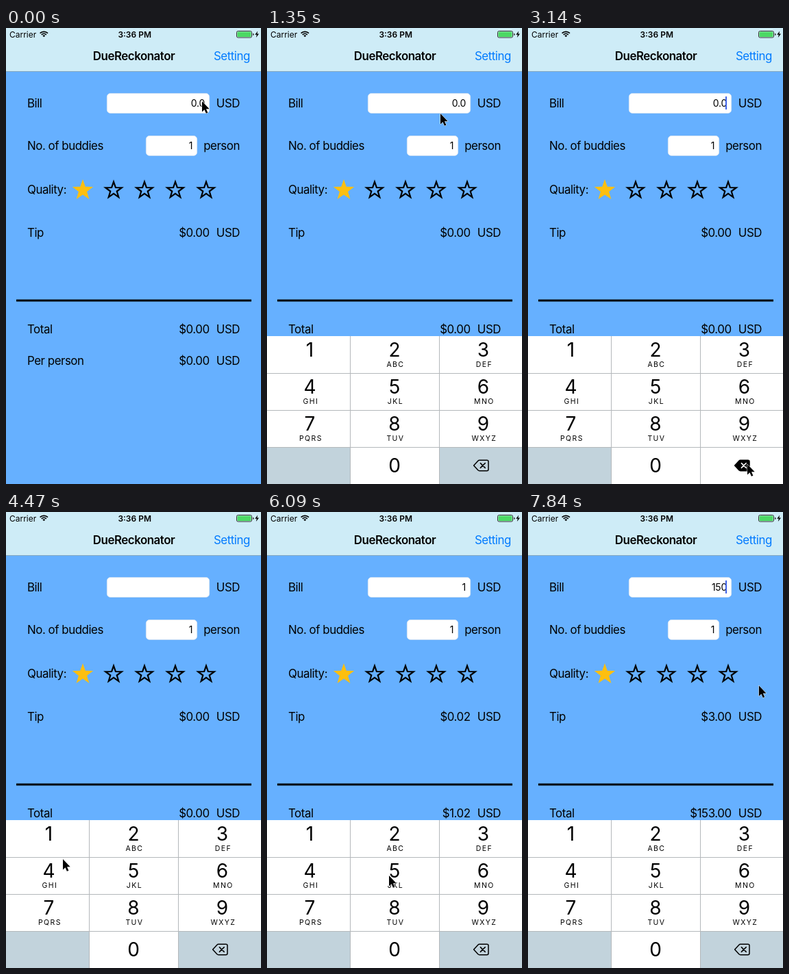
Write an HTML page that moves like this. It is 372 by 666 pixels and loops after 7.99 s.

```html
<!DOCTYPE html>
<html lang="en">
<head>
<meta charset="utf-8">
<title>DueReckonator</title>
<style>
  html, body { margin: 0; width: 100%; height: 100%; overflow: hidden; background: #66b0ff; }
  svg { display: block; width: 372px; height: 666px; font-family: Inter, Roboto, "Liberation Sans", sans-serif; }
  text { font-size: 16.9px; letter-spacing: -.47px; white-space: pre; }
  .end { text-anchor: end; }
  .mid { text-anchor: middle; }
  .input { font-size: 14px; letter-spacing: -.25px; }
  .status { font-size: 12px; letter-spacing: 0; }
  .bold { font-weight: 600; }
  .digit { font-size: 28px; letter-spacing: 0; }
  .letters { font-size: 10.5px; letter-spacing: 1.4px; }
  .star { fill: none; stroke: #000; stroke-width: 2.2; }
  .star.lit { fill: #fdbf0f; stroke: none; }
</style>
</head>
<body>
<svg viewBox="0 0 372 666">
  <rect width="372" height="666" fill="#66b0ff"/>

  <rect width="372" height="63" fill="#ceecf7"/>
  <rect y="63" width="372" height="1" fill="#86a9bf"/>
  <text class="status" x="5" y="13.5">Carrier</text>
  <g fill="none" stroke="#000" stroke-width="1.7">
    <path d="M49.6 7.7a8.1 8.1 0 0 1 11.4 0M51.8 9.9a5 5 0 0 1 7 0"/>
    <path d="M55.3 13.2l-1.9-2a2.7 2.7 0 0 1 3.8 0z" fill="#000" stroke="none"/>
  </g>
  <text class="status bold mid" x="187.7" y="13.5">3:36 PM</text>
  <rect x="336.5" y="4.5" width="22" height="9.5" rx="2" fill="none" stroke="#333"/>
  <rect x="337.5" y="5.5" width="20" height="7.5" rx="1" fill="#4cd964"/>
  <path d="M360 7.5q1.6 .4 1.6 1.8t-1.6 1.8z" fill="#333"/>
  <path d="M367.2 4.5l-4 5.3h2.6l-1 4.2 4.2-5.6h-2.7z"/>
  <text class="bold mid" x="186.5" y="47">DueReckonator</text>
  <text x="303" y="47" fill="#007aff">Setting</text>

  <text x="31" y="116">Bill</text>
  <text x="31" y="178">No. of buddies</text>
  <text x="31" y="242">Quality:</text>
  <text x="31" y="305">Tip</text>
  <text x="31" y="446">Total</text>
  <text x="31" y="491.5">Per person</text>
  <text class="end" x="341" y="178">person</text>
  <g id="units"></g>

  <g fill="#fff" stroke="#d3dfec" stroke-width=".6">
    <rect x="147.3" y="95.5" width="149.4" height="29" rx="5"/>
    <rect x="204.3" y="157.5" width="74.4" height="29" rx="5"/>
  </g>
  <text id="bill" class="input end" x="290" y="115"></text>
  <text class="input end" x="272.3" y="177">1</text>
  <rect id="caret" x="288" y="100" width="2" height="19" fill="#3f63e8"/>

  <g id="stars"></g>
  <text id="tip" class="end" x="296.6" y="305"></text>
  <rect x="15" y="396.5" width="343" height="3"/>
  <text id="total" class="end" x="296.6" y="446"></text>
  <text id="each" class="end" x="296.6" y="491.5"></text>

  <g id="pad">
    <rect y="450" width="372" height="216" fill="#fff"/>
    <g id="keys"></g>
    <path d="M0 504.5H372M0 558.5H372M0 612.5H372M121.5 450V666M251.5 450V666" stroke="#b4b8bb" fill="none"/>
    <g id="faces"></g>
    <g id="erase" stroke="#000" stroke-width="1.5" stroke-linejoin="round" stroke-linecap="round">
      <path d="M301.6 639l6.2-6.8q.9-.9 2.1-.9h11q2.1 0 2.1 2.1v11.2q0 2.1-2.1 2.1h-11q-1.2 0-2.1-.9z"/>
      <path id="cross" d="M311.4 635.6l6.8 6.8M318.2 635.6l-6.8 6.8"/>
    </g>
  </g>

  <path id="arrow" d="M0 0V15.4L3.5 12.2 5.9 17.8 8.4 16.7 6 11.3H10.7Z" stroke="#fff" stroke-width="1" paint-order="stroke"/>
</svg>
<script>
const $ = id => document.getElementById(id);
const LOOP = 7990, GREY = '#c2d3dc';

function add(parent, tag, attrs, text = '') {
  const el = document.createElementNS('http://www.w3.org/2000/svg', tag);
  for (const k in attrs) el.setAttribute(k, attrs[k]);
  el.textContent = text;
  return $(parent).appendChild(el);
}

function starPath(cx, cy, r) {
  const pts = Array.from({ length: 10 }, (_, i) => {
    const a = i * Math.PI / 5, d = i % 2 ? r * 0.4 : r;
    return (cx + d * Math.sin(a)).toFixed(2) + ' ' + (cy - d * Math.cos(a)).toFixed(2);
  });
  return 'M' + pts.join('L') + 'Z';
}

for (const y of [116, 305, 446, 491.5]) add('units', 'text', { class: 'end', x: 341, y }, 'USD');
for (let i = 0; i < 5; i++)
  add('stars', 'path', { class: i ? 'star' : 'star lit', d: starPath(112 + 45 * i, 237, i ? 12.4 : 16) });

// Keypad: one rect and one face per key
const left = [0, 122, 252], width = [121, 129, 120], middle = [62.5, 186, 315.5];
const letters = ['', 'ABC', 'DEF', 'GHI', 'JKL', 'MNO', 'PQRS', 'TUV', 'WXYZ'];
const keys = {};
['1', '2', '3', '4', '5', '6', '7', '8', '9', 'blank', '0', 'del'].forEach((name, i) => {
  const col = i % 3, y = 450 + 54 * Math.floor(i / 3);
  keys[name] = add('keys', 'rect', { x: left[col], y: y + (i > 2 ? 1 : 0), width: width[col], height: 53 });
  if (name.length > 1) return;
  add('faces', 'text', { class: 'digit mid', x: middle[col], y: y + (name === '0' ? 37 : 30) }, name);
  if (letters[i]) add('faces', 'text', { class: 'letters mid', x: middle[col] + 1.4, y: y + 45 }, letters[i]);
});

// Pointer stops: tick, x, y
const route = [
  [2, 286, 107], [4, 289, 111], [6, 289, 111], [9, 253, 125], [14, 253, 125],
  [16, 240, 190], [19, 318, 632], [20, 320, 637], [26, 320, 637], [30, 83, 507],
  [32, 66, 478], [36, 66, 478], [39, 140, 582], [41, 178, 531], [43, 178, 531],
  [45, 188, 638], [46, 188, 638], [49, 336, 267], [53, 337, 251]
];
// Bill entry: tick, text, amount
const typed = [[0, '0.0', 0], [21, '0.', 0], [23, '0', 0], [25, '', 0], [35, '1', 1], [42, '15', 15], [46, '150', 150]];
// Held keys: name, first tick, end tick
const presses = [['del', 20, 22], ['del', 23, 24], ['del', 25, 26], ['1', 34, 36], ['5', 42, 43], ['0', 45, 47]];
const caretOn = [[4, 8], [11, 15], [20, 28], [31, 39], [42, 48], [51, 54]];
const fadeIn = [11, 31];

function pointer(tick) {
  const i = route.findIndex(p => p[0] >= tick);
  if (i <= 0) return route[0].slice(1);
  const [t0, x0, y0] = route[i - 1], [t1, x1, y1] = route[i];
  const u = (tick - t0) / (t1 - t0), e = u * u * (3 - 2 * u);
  return [x0 + (x1 - x0) * e, y0 + (y1 - y0) * e];
}

// Critically damped rise
function padOffset(ms) {
  const s = Math.max(0, ms - 500) * 0.0116;
  const rest = 217 * (1 + s) * Math.exp(-s);
  return ms < 1300 ? rest : 0;
}

const money = v => '$' + v.toFixed(2);

function draw(ms) {
  // The screen refreshes in held ticks, slightly faster after three seconds
  const tick = Math.min(53, Math.floor(ms < 3000 ? ms / 150 : 20 + (ms - 2998) / 146.8));
  const [x, y] = pointer(tick);
  $('arrow').setAttribute('transform', `translate(${x} ${y})`);
  $('pad').setAttribute('transform', `translate(0 ${tick < 3 ? 217 : padOffset(tick * 150)})`);

  const [, text, bill] = typed.filter(s => s[0] <= tick).pop();
  $('bill').textContent = text;
  $('tip').textContent = money(bill * 0.02);
  $('total').textContent = $('each').textContent = money(bill * 1.02);

  const on = caretOn.some(([a, b]) => tick >= a && tick < b);
  $('caret').setAttribute('opacity', on ? (fadeIn.includes(tick) ? 0.5 : 1) : 0);

  const held = presses.find(([, a, b]) => tick >= a && tick < b);
  for (const name in keys) {
    const grey = (name.length > 1) !== (!!held && held[0] === name);
    keys[name].setAttribute('fill', grey ? GREY : '#fff');
  }
  const erasing = !!held && held[0] === 'del';
  $('erase').setAttribute('fill', erasing ? '#000' : 'none');
  $('cross').setAttribute('stroke', erasing ? '#fff' : '#000');
}

const start = performance.now();
function frame() {
  draw((performance.now() - start) % LOOP);
  requestAnimationFrame(frame);
}
draw(0);
requestAnimationFrame(frame);
</script>
</body>
</html>
```
